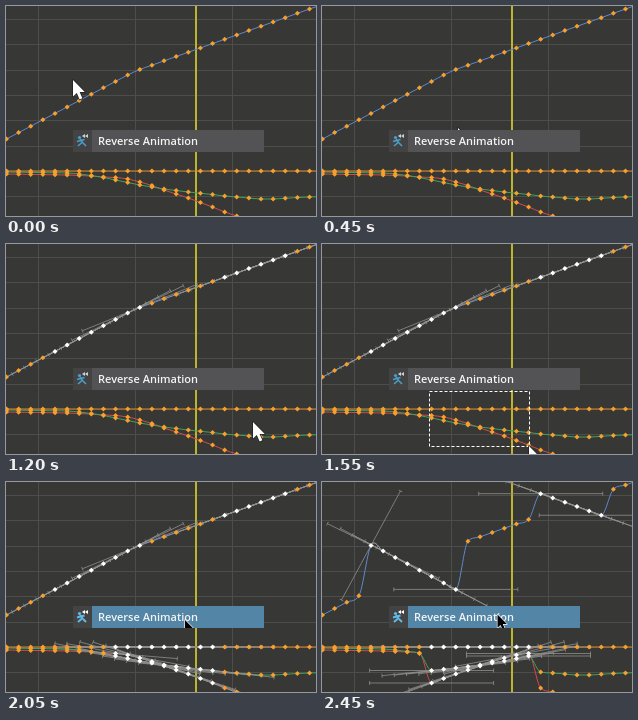
These frames come from a looping animation (310x210 px, 3.05 s). An HTML page with a canvas:

```html
<!DOCTYPE html>
<html lang="en">
<head>
<meta charset="utf-8">
<title>Reverse Animation</title>
<style>
  html, body { margin: 0; width: 100%; height: 100%; overflow: hidden; background: #373735; }
  canvas { display: block; }
</style>
</head>
<body>
<canvas id="stage" width="310" height="210"></canvas>
<script>
const ctx = document.getElementById('stage').getContext('2d');
const LOOP = 3050, TICK = 50, STEP = 12.12, COUNT = 27, HANDLE = 62;
const REVERSE_AT = 2450, HOVER_AT = 2050;
const ORANGE = '#f7a02d', GREY = '#8e8e8c';
const MENU = { x: 67, y: 124, w: 191, h: 22, split: 86 };

const keyX = i => 0.5 + i * STEP;
const series = f => Array.from({ length: COUNT }, (_, i) => f(i));

// Key groups picked by each marquee: first and last key, and when they light up
const pickA = { from: 4, to: 11, at: 500 };
const pickB = { from: 18, to: 23, at: 1100 };
const pickC = { from: 9, to: 17, at: 1650 };

const greenTail = [167, 168, 169.5, 171.5, 174, 176.5, 179, 181, 183, 184.5, 186, 187.3, 188.5, 190, 191, 192, 193, 193, 192.3, 191.5, 191, 190.5];
const redTail = [169.5, 170, 171, 171.5, 173, 176, 179.5, 184, 188, 192, 196.5, 201, 206, 210];

const curves = [
  { color: '#d04c4c', picks: [pickC],
    keys: series(i => i < 6 ? 168 + i * 0.2 : i < 20 ? redTail[i - 6] : 210 + (i - 19) * 4) },
  { color: '#3fa35a', picks: [pickC],
    keys: series(i => i < 5 ? 166 + i * 0.2 : greenTail[i - 5]) },
  { color: '#d98a2b', picks: [pickC], keys: series(() => 165) },
  { color: '#5f89cc', picks: [pickA, pickB], free: 4,
    keys: series(i => i < 11 ? 133 - 6.4 * i : 63.5 - 4.32 * (i - 11)) }
];

function reversed(c) {
  const keys = c.keys.slice();
  for (const p of c.picks)
    for (let i = p.from; i <= p.to; i++) keys[i] = c.keys[p.from + p.to - i];
  return keys;
}

// Auto tangents: flat at extremes, limited next to gentle segments
function slopes(keys, free) {
  return keys.map((y, i) => {
    const a = (y - keys[Math.max(i - 1, 0)]) / STEP;
    const b = (keys[Math.min(i + 1, COUNT - 1)] - y) / STEP;
    if (i === 0) return b;
    if (i === COUNT - 1) return a;
    const m = (a + b) / 2;
    if (i === free) return m;
    if (a * b <= 0) return 0;
    return Math.sign(m) * Math.min(Math.abs(m), 3 * Math.abs(a), 3 * Math.abs(b));
  });
}

for (const c of curves) {
  const after = reversed(c);
  c.before = { keys: c.keys, m: slopes(c.keys) };
  c.after = { keys: after, m: slopes(after, c.free) };
}

// Pointer path: time, x, y
const path = [
  [0, 67, 74], [100, 45, 56], [150, 45, 56], [400, 135, 119], [450, 136, 122],
  [500, 190, 62], [550, 243, 4], [600, 243, 4], [700, 213, -2], [750, 215, 1],
  [900, 262, 31], [1000, 285, 39], [1050, 286, 40], [1100, 275, 95],
  [1150, 258, 156], [1200, 247, 178], [1350, 107, 147], [1400, 118, 155],
  [1550, 207, 202], [1600, 210, 204], [1650, 198, 168], [1700, 180, 125]
];
const hoverPath = [[2050, 179, 138], [2250, 175.5, 132.5]];
const drags = [
  { from: 150, to: 400, x: 45, y: 56 },
  { from: 750, to: 1000, x: 213, y: -2 },
  { from: 1350, to: 1550, x: 107, y: 147 }
];

function along(points, t) {
  const n = points.findIndex(p => p[0] > t);
  if (n < 0) return points[points.length - 1].slice(1);
  const a = points[n - 1], b = points[n], k = (t - a[0]) / (b[0] - a[0]);
  return [a[1] + (b[1] - a[1]) * k, a[2] + (b[2] - a[2]) * k];
}

function line(x1, y1, x2, y2) {
  ctx.beginPath();
  ctx.moveTo(x1, y1);
  ctx.lineTo(x2, y2);
  ctx.stroke();
}

function polygon(...pts) {
  ctx.beginPath();
  pts.forEach(([x, y]) => ctx.lineTo(x, y));
  ctx.closePath();
}

function drawGrid() {
  ctx.fillStyle = '#373735';
  ctx.fillRect(0, 0, 310, 210);
  ctx.fillStyle = '#4d4d4b';
  for (let i = 0; i < 3; i++) ctx.fillRect(Math.round(32.4 + i * 96.8), 0, 1, 210);
  for (let i = 0; i < 8; i++) ctx.fillRect(0, Math.round(13 + i * 25.3), 310, 1);
  ctx.fillStyle = '#bdb52d';
  ctx.fillRect(189, 0, 2, 210);
}

function drawHandle(x, y, m) {
  const len = Math.hypot(1, m), ux = 1 / len, uy = m / len;
  line(x - ux * HANDLE, y - uy * HANDLE, x + ux * HANDLE, y + uy * HANDLE);
  for (const d of [-HANDLE, HANDLE]) {
    const ex = x + ux * d, ey = y + uy * d;
    line(ex - uy * 2, ey + ux * 2, ex + uy * 2, ey - ux * 2);
  }
}

function drawCurve(c, t) {
  const { keys, m } = t >= REVERSE_AT ? c.after : c.before;
  const picked = i => c.picks.some(p => t >= p.at && i >= p.from && i <= p.to);
  ctx.lineWidth = 1;
  for (let i = 0; i < COUNT - 1; i++) {
    const x = keyX(i), d = STEP / 3;
    ctx.strokeStyle = picked(i) && picked(i + 1) ? '#b4b4b2' : c.color;
    ctx.beginPath();
    ctx.moveTo(x, keys[i]);
    ctx.bezierCurveTo(x + d, keys[i] + m[i] * d, x + 2 * d, keys[i + 1] - m[i + 1] * d, x + STEP, keys[i + 1]);
    ctx.stroke();
  }
  ctx.strokeStyle = GREY;
  ctx.lineWidth = 0.8;
  keys.forEach((y, i) => { if (picked(i)) drawHandle(keyX(i), y, m[i]); });
  return () => keys.forEach((y, i) => {
    const x = keyX(i), r = 2.5;
    ctx.fillStyle = picked(i) ? '#fff' : ORANGE;
    polygon([x - r, y], [x, y - r], [x + r, y], [x, y + r]);
    ctx.fill();
  });
}

function drawMarquee(t, x, y) {
  const d = drags.find(d => t > d.from && t <= d.to);
  if (!d) return;
  ctx.strokeStyle = '#fff';
  ctx.lineWidth = 1;
  ctx.setLineDash([3, 2]);
  ctx.strokeRect(d.x + 0.5, d.y + 0.5, Math.round(x - d.x), Math.round(y - d.y));
  ctx.setLineDash([]);
}

function drawPointer(x, y, fill, edge, s) {
  ctx.save();
  ctx.translate(x, y);
  ctx.scale(s, s);
  polygon([0, 0], [0, 16.5], [3.8, 13], [6.6, 19.5], [9.4, 18.3], [6.6, 12], [11.8, 12]);
  ctx.lineJoin = 'round';
  ctx.lineWidth = 1.6;
  ctx.strokeStyle = edge;
  ctx.stroke();
  ctx.fillStyle = fill;
  ctx.fill();
  ctx.restore();
}

function drawIcon(hot) {
  ctx.strokeStyle = ctx.fillStyle = hot ? '#62b9e4' : '#4a9fca';
  ctx.lineWidth = hot ? 2 : 1.6;
  ctx.beginPath();
  ctx.arc(73.5, 131.5, 1.6, 0, 7);
  ctx.fill();
  line(74, 133, 77, 137);
  line(71, 135.5, 78.5, 133.5);
  line(77, 137, 80, 140);
  line(76, 136.5, 72, 140);
  ctx.fillStyle = hot ? '#fff' : '#c9d3d8';
  for (const x of [76, 79]) {
    polygon([x, 130], [x + 3, 128], [x + 3, 132]);
    ctx.fill();
  }
}

function drawMenu(t) {
  const { x, y, w, h, split } = MENU, hot = t >= HOVER_AT;
  ctx.fillStyle = '#434344';
  ctx.fillRect(x, y, w, h);
  ctx.fillStyle = hot ? '#5285a6' : '#535355';
  ctx.fillRect(split, y, x + w - split, h);
  drawIcon(hot);
  ctx.fillStyle = '#f4f4f4';
  ctx.font = '600 11px "Open Sans", "Noto Sans", sans-serif';
  ctx.fillText('Reverse Animation', 92, 139);
  if (!hot) return;
  ctx.save();
  ctx.beginPath();
  ctx.rect(x, y, w, h);
  ctx.clip();
  drawPointer(...along(hoverPath, t), '#000', '#fff', 0.8);
  ctx.restore();
}

function draw(t) {
  drawGrid();
  curves.map(c => drawCurve(c, t)).forEach(drawKeys => drawKeys());
  if (t < 1700) {
    const [x, y] = along(path, t);
    drawMarquee(t, x, y);
    drawPointer(x, y, '#fff', '#222', 1);
  }
  drawMenu(t);
}

const start = performance.now();
function frame() {
  const t = (performance.now() - start) % LOOP;
  draw(Math.floor(t / TICK) * TICK);
  requestAnimationFrame(frame);
}
frame();
</script>
</body>
</html>
```
